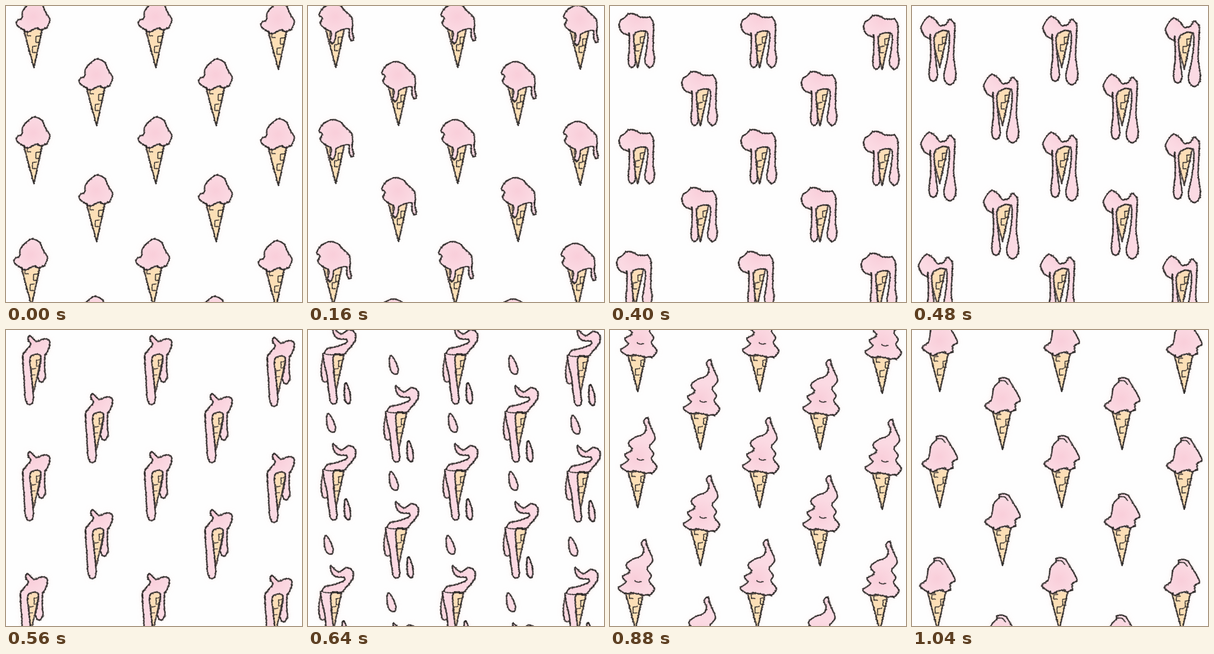
Recreate the animation shown at these times as an HTML page with a canvas. Size 500 by 500 pixels, loop 1.12 s.

```html
<!DOCTYPE html>
<html lang="en">
<head>
<meta charset="utf-8">
<title>Melting ice cream</title>
<style>
html, body { margin: 0; width: 100%; height: 100%; overflow: hidden; background: #fefefe; }
canvas { display: block; width: 500px; height: 500px; }
</style>
</head>
<body>
<canvas id="stage" width="500" height="500"></canvas>
<script>
const STEP = 80, POSES = 14;
const BOX = { x: 0, y: 130, w: 110, h: 215 };
const INK = '#2c2928', PINK = '#fbdae3', WAFER = '#fcdfb6';
const CONE = [[30, 236], [47, 300], [61, 236]];

// dome: a few points over the top, clockwise.
// right, left: drips as top x, y, half width, then tip x, y, half width.
const keys = [
  { at: 0, dome: '28,236 18,227 20,220 27,216 29,203 46,188 60,193 67,207 74,219 68,234',
    right: [60, 233, 6, 59, 236, 5], left: [38, 236, 7, 36, 240, 5] },
  { at: 2, dome: '30,235 21,226 24,216 19,212 24,201 40,192 55,196 63,205 74,216 75,236',
    right: [71, 234, 3, 74, 255, 3], left: [44, 240, 5, 41, 260, 4] },
  { at: 4, dome: '33,240 18,233 17,215 27,213 33,203 47,199 63,203 73,214 75,238',
    right: [69, 240, 6, 70, 271, 6], left: [39, 241, 5, 38, 276, 5] },
  { at: 6, dome: '30,252 19,244 16,230 28,214 40,220 47,229 57,227 64,219 72,227 72,240',
    right: [67, 240, 5, 64, 329, 10], left: [35, 245, 4, 36, 323, 7] },
  { at: 8, dome: '28,236 32,228 48,224 65,217 64,212 52,211 44,204 42,192 51,200 58,202 70,195 80,203 78,217 62,236',
    right: [57, 237, 3, 56, 239, 3], left: [34, 240, 9, 43, 321, 6],
    drops: [[38, 157, 8, 16, -4], [66, 303, 6, 18, -2], [29, 260, 8, 24, 0]],
    fold: '59,237 43,238 30,237' },
  { at: 11, dome: '29,239 18,230 31,220 25,211 37,202 31,191 41,182 57,175 61,165 57,154 64,148 67,160 76,182 67,197 74,209 70,218 79,232 70,243',
    right: [63, 241, 6, 62, 242, 5], left: [36, 238, 5, 34, 239, 4],
    fold: '46,218 51,220 57,219' },
  { at: 13, dome: '30,236 17,226 28,216 32,196 42,184 41,180 55,180 65,194 75,211 76,218 69,222 69,234',
    right: [61, 233, 5, 60, 236, 5], left: [38, 235, 6, 36, 239, 5],
    fold: '42,184 50,184 56,190' }
];

const places = [];
[[0, -196], [0, 0], [-4, 206]].forEach(([x, y]) =>
  places.push([x, y], [x + 206, y], [x + 413, y + 3]));
[[106, -98], [106, 98], [102, 303]].forEach(([x, y]) =>
  places.push([x, y], [x + 202, y]));

const lerp = (a, b, f) => a + (b - a) * f;
const mix = (a, b, f) => a.map((v, i) => lerp(v, b[i], f));
const mixPath = (a, b, f) => a.map((p, i) => mix(p, b[i], f));
const parse = s => s.split(' ').map(p => p.split(',').map(Number));
const gap = (a, b) => Math.hypot(b[0] - a[0], b[1] - a[1]);

function random(seed) {
  return () => (seed = (seed * 1664525 + 1013904223) >>> 0) / 4294967296;
}

// Catmull-Rom curve through the points.
function smooth(pts) {
  const out = [], last = pts.length - 1;
  for (let i = 0; i < last; i++) {
    const a = pts[Math.max(i - 1, 0)], b = pts[i], c = pts[i + 1], d = pts[Math.min(i + 2, last)];
    for (let t = 0; t < 1; t += 0.1) {
      out.push([0, 1].map(k => 0.5 * (2 * b[k] + (c[k] - a[k]) * t +
        (2 * a[k] - 5 * b[k] + 4 * c[k] - d[k]) * t * t +
        (3 * b[k] - a[k] - 3 * c[k] + d[k]) * t * t * t)));
    }
  }
  return [...out, pts[last]];
}

function resample(pts, count) {
  const len = [0];
  for (let i = 1; i < pts.length; i++) len.push(len[i - 1] + gap(pts[i - 1], pts[i]));
  const out = [];
  for (let n = 0, j = 1; n < count; n++) {
    const d = len[len.length - 1] * n / (count - 1);
    while (j < pts.length - 1 && len[j] < d) j++;
    out.push(mix(pts[j - 1], pts[j], (d - len[j - 1]) / (len[j] - len[j - 1] || 1)));
  }
  return out;
}

// Runs down the right side of a drip, round its tip and up the left.
function drip([x, y, w, tipX, tipY, tipW]) {
  const midX = lerp(x, tipX, 0.5), midY = lerp(y, tipY, 0.45), neck = Math.min(w, tipW);
  const bulbY = tipY - Math.min(tipW * 1.3, (tipY - y) * 0.4);
  return [[x + w, y], [midX + neck, midY], [tipX + tipW, bulbY], [tipX, tipY],
    [tipX - tipW, bulbY], [midX - neck, midY], [x - w, y]];
}

function drop([x, y, rx, ry, lean]) {
  return Array.from({ length: 41 }, (_, i) => {
    const t = i * Math.PI / 20;
    return [x + rx * Math.sin(t) * (0.8 - 0.25 * Math.cos(t)) + lean * Math.cos(t),
      y - ry * Math.cos(t)];
  });
}

const bracket = (x, y, h) => [[x + 7, y - 1], [x, y], [x, y + h], [x + 6, y + h]];

function trace(c, pts) {
  c.beginPath();
  pts.forEach(p => c.lineTo(p[0], p[1]));
}

function wash(c, pts, color) {
  c.save();
  c.shadowColor = 'rgba(252,215,208,.55)';
  c.shadowBlur = 9;
  c.fillStyle = color;
  trace(c, pts);
  c.fill();
  c.restore();
}

// Crayon line: a thin core with crumbly dots along it.
function crayon(c, pts, rnd, width = 3.2) {
  c.strokeStyle = c.fillStyle = INK;
  c.globalAlpha = 0.75;
  c.lineWidth = width * 0.65;
  c.lineJoin = c.lineCap = 'round';
  trace(c, pts);
  c.stroke();
  const length = pts.reduce((sum, p, i) => sum + (i ? gap(pts[i - 1], p) : 0), 0);
  resample(pts, Math.ceil(length / 0.9) + 2).forEach(([x, y]) => {
    c.globalAlpha = 0.35 + rnd() * 0.5;
    c.beginPath();
    c.arc(x + (rnd() - 0.5) * width * 0.75, y + (rnd() - 0.5) * width * 0.75,
      width * (0.2 + rnd() * 0.22), 0, 7);
    c.fill();
  });
  c.globalAlpha = 1;
}

function blush(c, pts) {
  const g = c.createRadialGradient(46, 214, 2, 46, 214, 28);
  g.addColorStop(0, 'rgba(244,178,196,.28)');
  g.addColorStop(1, 'rgba(244,178,196,0)');
  c.fillStyle = g;
  trace(c, pts);
  c.fill();
}

for (const k of keys) k.dome = resample(smooth(parse(k.dome)), 160);

function drawPose(i) {
  const n = keys.findLastIndex(k => k.at <= i);
  const a = keys[n], b = keys[n + 1] || a;
  const f = a === b ? 0 : (i - a.at) / (b.at - a.at);
  const near = f > 0.5 ? b : a;
  const dome = mixPath(a.dome, b.dome, f);
  const hem = smooth([dome[dome.length - 1], ...drip(mix(a.right, b.right, f)),
    ...drip(mix(a.left, b.left, f)), dome[0]]);
  const cream = dome.concat(hem);
  const rnd = random(i * 97 + 11);
  const wobble = () => (rnd() - 0.5) * 3;

  const sprite = document.createElement('canvas');
  sprite.width = BOX.w;
  sprite.height = BOX.h;
  const c = sprite.getContext('2d');
  c.translate(-BOX.x, -BOX.y);

  wash(c, CONE, WAFER);
  crayon(c, CONE, rnd);
  [[36, 240, 7], [51, 248, 10], [44, 263, 10]].forEach(([x, y, h]) =>
    crayon(c, bracket(x + wobble(), y + wobble(), h), rnd, 2.2));
  (near.drops || []).forEach(([x, y, ...size]) => {
    const shape = drop([x, y + f * 55, ...size]);
    wash(c, shape, PINK);
    crayon(c, shape, rnd);
  });
  wash(c, cream, PINK);
  blush(c, cream);
  crayon(c, cream, rnd);
  if (near.fold) crayon(c, smooth(parse(near.fold)), rnd, 2.4);
  return sprite;
}

const poses = Array.from({ length: POSES }, (_, i) => drawPose(i));
const ctx = document.getElementById('stage').getContext('2d');
const start = performance.now();
let shown = -1;

function render() {
  const i = Math.floor((performance.now() - start) / STEP) % POSES;
  if (i !== shown) {
    shown = i;
    ctx.fillStyle = '#fefefe';
    ctx.fillRect(0, 0, 500, 500);
    places.forEach(([x, y]) => ctx.drawImage(poses[i], BOX.x + x, BOX.y + y));
  }
  requestAnimationFrame(render);
}
render();
</script>
</body>
</html>
```
